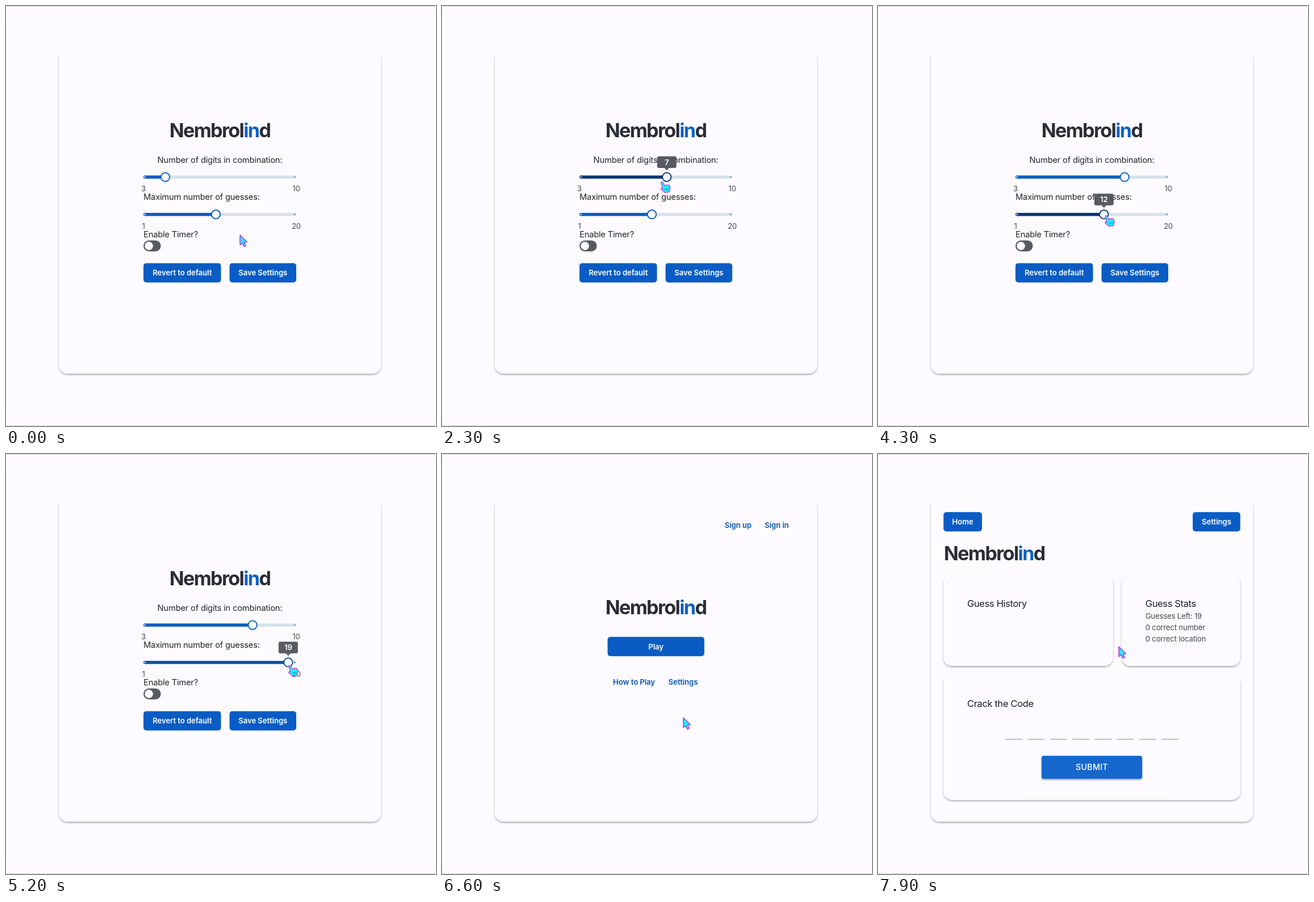
Recreate the animation shown at these times as an HTML page. Size 757 by 739 pixels, loop 8 s.

```html
<!DOCTYPE html>
<html lang="en">
<head>
<meta charset="utf-8">
<title>Code guessing game</title>
<style>
  html, body { margin: 0; width: 100%; height: 100%; overflow: hidden; background: #fdfbff; }
  svg { display: block; width: 100%; height: 100%; font-family: Inter, "Noto Sans", sans-serif; }
  .title { font-size: 34px; font-weight: 700; letter-spacing: -1.6px; fill: #2a2d34; }
  .title tspan { fill: #0a60c9; }
  .label { font-size: 14.7px; letter-spacing: -.19px; fill: #1f2328; }
  .head { font-size: 16.5px; letter-spacing: -.35px; fill: #1c1e22; }
  .small { font-size: 13.2px; letter-spacing: -.2px; fill: #45484d; }
  .bold { font-size: 13.2px; font-weight: 600; letter-spacing: -.09px; }
  .link { fill: #0a55b0; }
  .submit { font-size: 14.2px; font-weight: 500; letter-spacing: .3px; fill: #fff; }
  .mid { text-anchor: middle; }
</style>
</head>
<body>
<svg id="stage" viewBox="0 0 757 739" preserveAspectRatio="none"></svg>
<script>
const LOOP = 8000, STEP = 100;
const BLUE = '#0a5cc4', HOVER = '#174f9a', PAPER = '#fdfbff', GREY = '#575a61';
const HOME_AT = 6500, GAME_AT = 7500;

// Pointer path: time, x, y of the tip
const PATH = [
  [0, 412, 403], [200, 408, 398], [900, 286, 303], [1200, 286, 303], [1400, 301, 305],
  [2000, 352, 309], [2700, 440, 311], [3000, 437, 309], [3300, 428, 318],
  [3800, 374, 367], [4000, 374, 367], [4300, 401, 369], [5000, 500, 371], [5200, 499, 372],
  [5900, 432, 460], [6200, 425, 464], [6750, 425, 464], [7200, 428, 352],
  [7500, 428, 348], [7900, 424, 339], [8000, 424, 339]
];
// Spans with the hand pointer
const HAND = [[900, 3400], [3700, 5300], [5800, 6500], [6800, 7500]];
const SLIDERS = [
  { y: 301, min: 3, max: 10, hover: 900, press: 1200, drop: 2700, leave: 3500 },
  { y: 366.7, min: 1, max: 20, hover: 3700, press: 4000, drop: 5000, leave: 5400 }
];
const LEFT = 242, RIGHT = 511, GRIP = 8;

const within = (t, a, b) => t >= a && t < b;
const clamp = (v, a, b) => Math.min(b, Math.max(a, v));

function pointerAt(t) {
  const i = Math.max(1, PATH.findIndex(p => p[0] > t));
  const [t0, x0, y0] = PATH[i - 1], [t1, x1, y1] = PATH[i];
  const k = (t - t0) / (t1 - t0), e = k * k * (3 - 2 * k);
  return [x0 + (x1 - x0) * e, y0 + (y1 - y0) * e];
}

const text = (x, y, cls, s, extra = '') => `<text x="${x}" y="${y}" class="${cls}" ${extra}>${s}</text>`;
const rect = (x, y, w, h, r, fill, extra = '') =>
  `<rect x="${x}" y="${y}" width="${w}" height="${h}" rx="${r}" fill="${fill}" ${extra}/>`;
const circle = (x, y, r, fill, extra = '') => `<circle cx="${x}" cy="${y}" r="${r}" fill="${fill}" ${extra}/>`;
const panel = (x, y, w, h) => rect(x, y, w, h, 15, PAPER, 'filter="url(#lift)"');
const button = (x, y, w, label, fill = BLUE) =>
  rect(x, y, w, 34, 5, fill) + text(x + w / 2, y + 21.8, 'bold mid', label, 'fill="#fff"');
const title = (x, y, cls = '') => text(x, y, 'title ' + cls, 'Nembrol<tspan>in</tspan>d');

function slider(s, t) {
  const unit = (RIGHT - LEFT) / (s.max - s.min);
  const x = pointerAt(clamp(t, s.press, s.drop))[0] - GRIP;
  const value = clamp(Math.round(s.min + (x - LEFT) / unit), s.min, s.max);
  const pos = LEFT + (value - s.min) * unit;
  const on = within(t, s.hover, s.leave);
  const colour = within(t, s.press, s.drop + 100) ? '#0d3672' : on ? '#144f9e' : BLUE;
  let out = rect(LEFT, s.y - 2.7, RIGHT - LEFT, 5.4, 2.7, '#d6e1e9')
    + rect(LEFT, s.y - 2.7, pos - LEFT, 5.4, 2.7, colour)
    + circle(LEFT + 2.8, s.y, 1.2, '#fff') + circle(RIGHT - 2.8, s.y, 1.1, '#285e91')
    + text(LEFT, s.y + 25, 'small mid', s.min) + text(RIGHT, s.y + 25, 'small mid', s.max)
    + circle(pos, s.y, 7.7, '#fff', `stroke="${colour}" stroke-width="1.9"`);
  if (on) {
    out += rect(pos - 17, s.y - 36.5, 34, 20.5, 3, GREY)
      + `<path d="M${pos - 4.5} ${s.y - 16.3}h9l-4.5 4.5z" fill="${GREY}"/>`
      + text(pos, s.y - 21.3, 'bold mid', value, 'fill="#fff"');
  }
  return out;
}

function settings(t) {
  return title(376.5, 231, 'mid')
    + text(376.5, 275.5, 'label mid', 'Number of digits in combination:')
    + text(242, 341.3, 'label', 'Maximum number of guesses:')
    + text(242, 407, 'label', 'Enable Timer?')
    + rect(242, 412.5, 30.6, 19.2, 9.6, GREY) + circle(251.6, 422.1, 7.3, '#fff')
    + button(242, 452.4, 136.5, 'Revert to default')
    + button(393.5, 452.4, 117.5, 'Save Settings', t >= 5800 ? HOVER : BLUE)
    + SLIDERS.map(s => slider(s, t)).join('');
}

function home(t) {
  return text(497.5, 129.6, 'bold link', 'Sign up') + text(568, 129.6, 'bold link', 'Sign in')
    + title(376.5, 282, 'mid')
    + button(291.5, 321.8, 170.3, 'Play', t >= 7100 ? HOVER : BLUE)
    + text(301, 406, 'bold link', 'How to Play') + text(398.5, 406, 'bold link', 'Settings');
}

function game() {
  let dashes = '';
  for (let i = 0; i < 8; i++) dashes += rect(223.8 + i * 39.35, 501.2, 30.3, 1.3, 0, '#a3a3a8');
  return button(115.3, 102.2, 67.8, 'Home') + button(554, 102.2, 83.8, 'Settings')
    + title(116, 187)
    + panel(115.3, 212, 298.5, 161) + panel(429, 212, 208.7, 161) + panel(115.3, 388, 522.4, 220.7)
    + text(157, 268.7, 'head', 'Guess History')
    + text(470.7, 268.7, 'head', 'Guess Stats')
    + ['Guesses Left: 19', '0 correct number', '0 correct location']
      .map((s, i) => text(470.7, 290 + i * 19.9, 'small', s)).join('')
    + text(157, 444.7, 'head', 'Crack the Code') + dashes
    + rect(288, 531, 177, 40.5, 3.8, '#1867cf', 'filter="url(#lift)"')
    + text(376.5, 556, 'submit mid', 'SUBMIT');
}

function pointer(t) {
  const [x, y] = pointerAt(t);
  const hand = HAND.some(([a, b]) => within(t, a, b));
  const shape = hand
    ? `<path d="M-1 1Q1-1.5 2.6 1.2L4.6 6 7 5.2 9 5.6 11.5 5 13.5 6Q15.5 9 14.5 13L13.5 17.5 5.5 18.5-1 13Q-2 10.8.5 10.5L2 11.2Z"
        fill="#1cf1fa" stroke="#c44bdc" stroke-width="1.5"/>
       <path d="M6 11.5l.5 3.8M8.8 11.2l.4 3.8M11.5 10.8l.2 3.8" stroke="#3f6bc4" stroke-width="1" fill="none"/>`
    : `<path d="M0 0V17.5L4 14.2 7.2 20.3 10.2 18.8 7.5 13.2 12.3 12.3Z" fill="#1cf1fa" stroke="#b13fdd" stroke-width="1.6"/>`;
  return `<g transform="translate(${x} ${y})" stroke-linejoin="round">${shape}</g>`;
}

const stage = document.getElementById('stage');
stage.innerHTML = `<defs><filter id="lift" x="-10%" y="-10%" width="120%" height="125%">
    <feDropShadow dx="0" dy="1.7" stdDeviation="1.6" flood-color="#000" flood-opacity=".38"/></filter></defs>`
  + rect(0, 0, 757, 739, 0, PAPER) + rect(0, 0, 757, 1, 0, '#d4d3d7') + rect(0, 738, 757, 1, 0, '#d4d3d7')
  + panel(93, 79.7, 567.5, 567.3) + '<g id="view"></g>';
const view = document.getElementById('view');

let shown = -1;
function render(ms) {
  const t = Math.floor((ms % LOOP) / STEP) * STEP;
  if (t !== shown) {
    shown = t;
    const screen = t < HOME_AT ? settings : t < GAME_AT ? home : game;
    view.innerHTML = screen(t) + pointer(t);
  }
}

const start = performance.now();
function tick() {
  render(performance.now() - start);
  requestAnimationFrame(tick);
}
tick();
</script>
</body>
</html>
```
